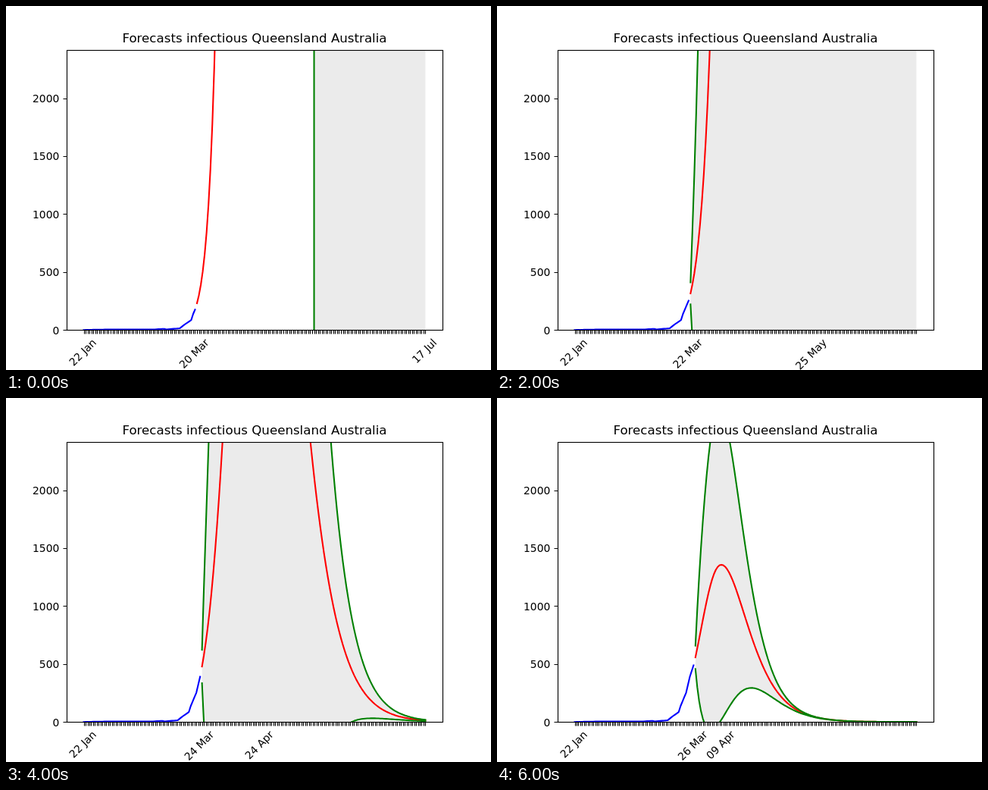
These frames come from a looping animation (640 by 480 pixels, 7000 ms). An HTML page:

```html
<!DOCTYPE html>
<html lang="en">
<head>
<meta charset="utf-8">
<title>Infection forecasts</title>
<style>
  html, body { margin: 0; width: 100%; height: 100%; overflow: hidden; background: #fff; }
  svg { display: block; width: 640px; height: 480px; }
  text { font: 13.889px "DejaVu Sans", sans-serif; fill: #000; white-space: pre; }
  #title { font-size: 16.667px; }
  .line { fill: none; stroke-width: 2.083; stroke-linecap: square; stroke-linejoin: round; }
  .axis { fill: none; stroke: #000; stroke-width: 1.111; }
</style>
</head>
<body>
<svg viewBox="0 0 640 480" width="640" height="480">
  <defs><clipPath id="plot"><rect x="80" y="58" width="496" height="369.2"/></clipPath></defs>
  <rect width="640" height="480" fill="#fff"/>
  <g clip-path="url(#plot)">
    <path id="area" fill="#ebebeb"/>
    <path id="known" class="line" stroke="#00f"/>
    <path id="mean" class="line" stroke="#f00"/>
    <path id="bounds" class="line" stroke="#008000"/>
  </g>
  <path id="ticks" class="axis"/>
  <rect class="axis" x="80.5" y="58.5" width="496" height="369"/>
  <text id="title" x="328" y="48" text-anchor="middle">Forecasts infectious Queensland Australia</text>
  <g id="scale" text-anchor="end"></g>
  <g id="dates" text-anchor="middle"></g>
</svg>
<script>
const LEFT = 102.545, RIGHT = 553.455, BASE = 427.2, UNIT = 0.15276;
const STEP_MS = 1000, FIRST_DAYS = 178, FIRST_KNOWN = 58;
const RECOVERY = 0.0957, RISE_POWER = 2.15;
const $ = id => document.getElementById(id);
const yOf = v => BASE - v * UNIT;

// Key points of the recorded cases: [day, infectious]
const cases = [[0, 0], [8, 3], [16, 5], [36, 4], [42, 10], [43, 5], [50, 14], [53, 52],
  [56, 86], [57, 137], [60, 253], [62, 391], [64, 489]];

// One forecast per step. start, top: mean on its first and its peak day; width: days of slow decay.
// band: relative half width at first, its ceiling, days to open and days to close.
// wall: day from which the band exceeds the plot.
const stages = [
  { peak: 178, start: 230, top: 5.6e8, wall: 120 },
  { peak: 177, start: 273, top: 2.1e8, wall: 98.3 },
  { peak: 125, start: 316, top: 225000, width: 30, band: [0.3, 2.8, 2.3, 200] },
  { peak: 103, start: 384, top: 18700, width: 26.1, band: [0.335, 2.91, 2.75, 130] },
  { peak: 94, start: 479, top: 6890, width: 23, band: [0.3, 1.97, 1.8, 96.8] },
  { peak: 80, start: 512, top: 1580, width: 14.6, band: [0.176, 1.16, 1.57, 43] },
  { peak: 79, start: 558, top: 1357, width: 14.7, band: [0.18, 1.13, 2.18, 38] }
];

function caseAt(day) {
  const i = Math.max(1, cases.findIndex(c => c[0] >= day));
  const [d0, v0] = cases[i - 1], [d1, v1] = cases[i];
  return v0 + (v1 - v0) * (day - d0) / (d1 - d0);
}

// Epidemic wave: power-law rise in log scale, then decay towards the recovery rate
function meanAt({ peak, start, top, width }, first, day) {
  const d = day - peak;
  const drop = d <= 0
    ? Math.log(top / start) * (d / (first - peak)) ** 2 ** 0 * Math.abs(d / (first - peak)) ** (RISE_POWER - 1)
    : RECOVERY * (d + width * (Math.exp(-d / width) - 1));
  return Math.min(top * Math.exp(-drop), 20000);
}

function spreadAt([initial, ceiling, opening, closing], t) {
  const open = ceiling - (ceiling - initial) * Math.exp(-t / opening);
  return open * Math.exp(-((t / closing) ** 2));
}

function dateOf(day) {
  const date = new Date(Date.UTC(2020, 0, 22 + day));
  const month = "JanFebMarAprMayJunJul".substr(date.getUTCMonth() * 3, 3);
  return String(date.getUTCDate()).padStart(2, "0") + " " + month;
}

function addText(parent, text, x, y) {
  const node = document.createElementNS("http://www.w3.org/2000/svg", "text");
  node.textContent = text;
  node.setAttribute("x", x);
  node.setAttribute("y", y);
  parent.append(node);
  return node;
}

// Slanted label whose bounding box hangs centred below its tick
function addDate(day, x) {
  const node = addText($("dates"), dateOf(day), 0, 4);
  const half = (node.getComputedTextLength() + 14) * Math.SQRT1_2 / 2;
  node.setAttribute("transform", `translate(${x - 0.7} ${436.9 + half}) rotate(-45)`);
}

const trace = points => "M" + points.map(p => p[0].toFixed(2) + " " + p[1].toFixed(2)).join("L");
const range = (from, to) => Array.from({ length: to - from + 1 }, (_, i) => from + i);

let scaleTicks = "";
for (let v = 0; v <= 2000; v += 500) {
  addText($("scale"), v, 70.3, Math.round(yOf(v) + 5.4));
  scaleTicks += `M80.5 ${Math.round(yOf(v)) + 0.5}h-5`;
}

function draw(k) {
  const stage = stages[k], days = FIRST_DAYS + k, today = FIRST_KNOWN + k, first = today + 1;
  const xOf = day => LEFT + (RIGHT - LEFT) * day / days;
  const plot = (from, to, value) => range(from, to).map(day => [xOf(day), yOf(value(day))]);
  const mean = day => meanAt(stage, first, day);

  $("ticks").setAttribute("d", scaleTicks
    + range(0, days).map(day => `M${Math.round(xOf(day)) + 0.5} 427.5v5`).join(""));
  $("known").setAttribute("d", trace(plot(0, today, caseAt)));
  $("mean").setAttribute("d", trace(plot(first, days, mean)));

  if (stage.wall) {
    const x = xOf(stage.wall);
    $("area").setAttribute("d", `M${x} 50H${RIGHT}V440H${x}Z`);
    $("bounds").setAttribute("d", `M${x} 50V440`);
  } else {
    const edge = sign => plot(first, days,
      day => mean(day) * (1 + sign * spreadAt(stage.band, day - first)));
    const high = edge(1), low = edge(-1);
    $("area").setAttribute("d", trace([...high, ...low.slice().reverse()]) + "Z");
    $("bounds").setAttribute("d", trace(high) + trace(low));
  }

  $("dates").replaceChildren();
  addDate(0, xOf(0));
  addDate(today, xOf(today));
  addDate(stage.peak - 1, xOf(stage.peak));
}

let shown = -1;
function tick() {
  const k = Math.floor(performance.now() / STEP_MS) % stages.length;
  if (k !== shown) draw(shown = k);
  requestAnimationFrame(tick);
}
tick();
</script>
</body>
</html>
```
